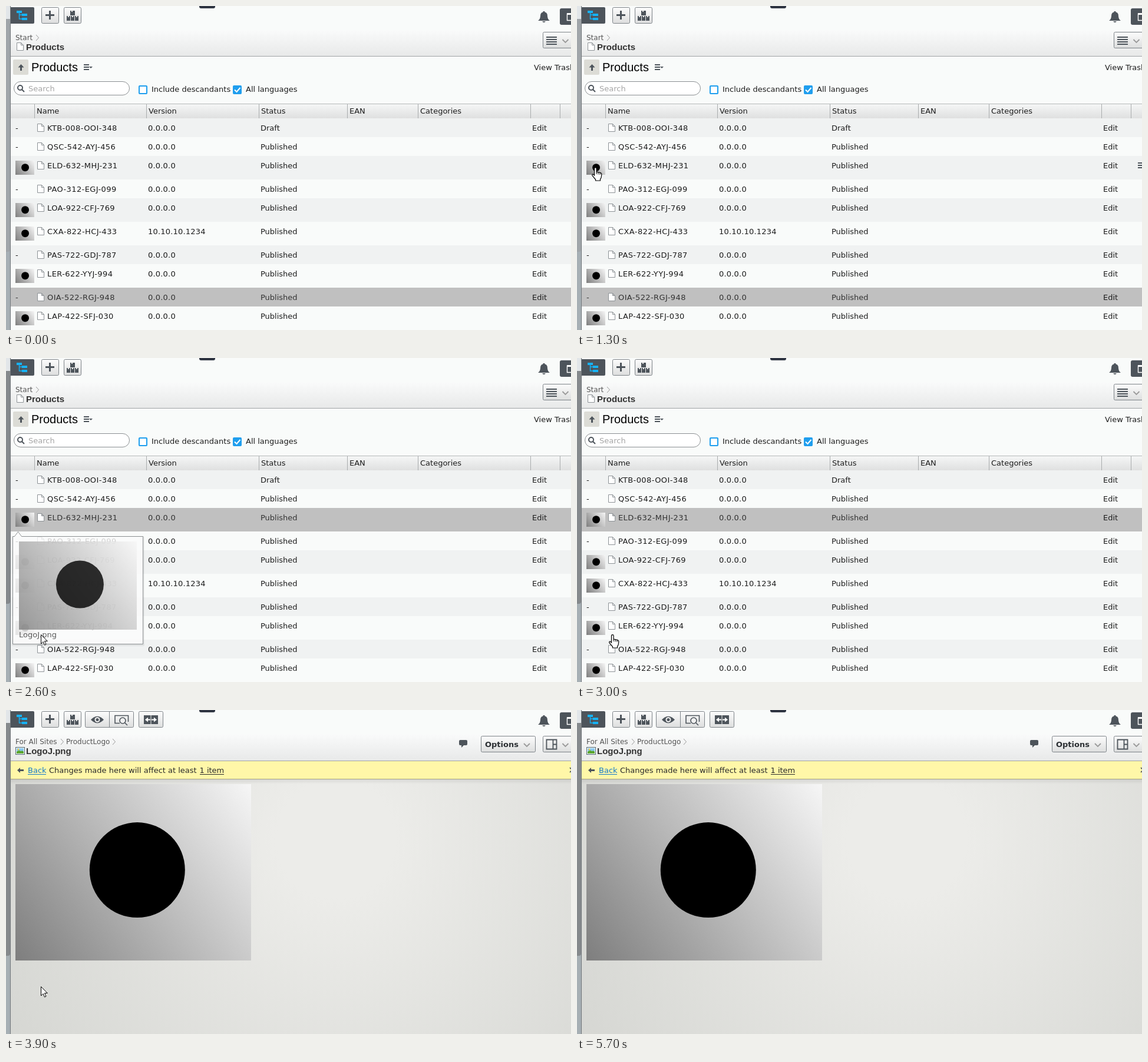
Animation of 959x551 px, one loop 5800 ms. Source, as an HTML page with a canvas:

```html
<!DOCTYPE html>
<html lang="en">
<head>
<meta charset="utf-8">
<title>Product list</title>
<style>
  html, body { margin: 0; width: 100%; height: 100%; overflow: hidden; background: #f9fbfa; }
  canvas { display: block; }
</style>
</head>
<body>
<canvas id="stage" width="959" height="551"></canvas>
<script>
const ctx = document.getElementById('stage').getContext('2d');
const LOOP = 5800, STEP = 100;
const SANS = '"DejaVu Sans", Verdana, sans-serif';
const ARIAL = '"Liberation Sans", Arial, sans-serif';
const DARK = '#4d545b', INK = '#1c1c1c', BLUE = '#1f9eee';

// name, version, status, row height, has thumbnail
const ROWS = [
  ['KTB-008-OOI-348', '0.0.0.0', 'Draft', 32, false],
  ['QSC-542-AYJ-456', '0.0.0.0', 'Published', 32, false],
  ['ELD-632-MHJ-231', '0.0.0.0', 'Published', 40, true],
  ['PAO-312-EGJ-099', '0.0.0.0', 'Published', 32, false],
  ['LOA-922-CFJ-769', '0.0.0.0', 'Published', 40, true],
  ['CXA-822-HCJ-433', '10.10.10.1234', 'Published', 40, true],
  ['PAS-722-GDJ-787', '0.0.0.0', 'Published', 32, false],
  ['LER-622-YYJ-994', '0.0.0.0', 'Published', 40, true],
  ['OIA-522-RGJ-948', '0.0.0.0', 'Published', 32, false],
  ['LAP-422-SFJ-030', '0.0.0.0', 'Published', 40, true]
];
const COLUMNS = [[48, 'Name'], [238, 'Version'], [429, 'Status'], [579, 'EAN'], [699, 'Categories'], [890, ''], [940, '']];

// time, hotspot x, hotspot y, shape, hovered row
const POINTER = [
  [0, 0, 0, null, -1], [100, 596, 149, 'arrow', -1],
  [300, 490, 186, 'arrow', -1], [400, 367, 227, 'arrow', 1],
  [600, 210, 206, 'arrow', 0], [700, 58, 250, 'hand', 1],
  [900, 53, 256, 'hand', 2], [1000, 47, 261, 'hand', 2],
  [1100, 40, 266, 'hand', 2], [1200, 34, 271, 'hand', 2],
  [1300, 30, 274, 'hand', 2], [1800, 61, 276, 'hand', 2],
  [2200, 61, 318, 'arrow', -1], [2300, 58, 385, 'arrow', -1],
  [2400, 55, 436, 'arrow', -1], [2600, 59, 470, 'arrow', -1],
  [3000, 59, 470, 'hand', -1], [3800, 59, 470, 'arrow', -1],
  [4100, 394, 282, 'arrow', -1], [5100, 505, 262, 'arrow', -1],
  [5200, 607, 241, 'arrow', -1], [5400, 690, 229, 'arrow', -1],
  [5500, 795, 217, 'arrow', -1], [5600, 889, 209, 'arrow', -1],
  [5700, 0, 0, null, -1]
];

function rect(x, y, w, h, fill) {
  ctx.fillStyle = fill;
  ctx.fillRect(x, y, w, h);
}
function linear(x0, y0, x1, y1, from, to) {
  const g = ctx.createLinearGradient(x0, y0, x1, y1);
  g.addColorStop(0, from);
  g.addColorStop(1, to);
  return g;
}
function path(d, fill, stroke, width = 1, x = 0, y = 0) {
  const p = new Path2D(d);
  ctx.save();
  ctx.translate(x, y);
  if (fill) { ctx.fillStyle = fill; ctx.fill(p); }
  if (stroke) { ctx.strokeStyle = stroke; ctx.lineWidth = width; ctx.stroke(p); }
  ctx.restore();
}
function rounded(x, y, w, h, r, fill, stroke, width = 1) {
  ctx.beginPath();
  ctx.roundRect(x, y, w, h, r);
  if (fill) { ctx.fillStyle = fill; ctx.fill(); }
  if (stroke) { ctx.strokeStyle = stroke; ctx.lineWidth = width; ctx.stroke(); }
}
function disc(x, y, r, fill) {
  ctx.beginPath();
  ctx.arc(x, y, r, 0, Math.PI * 2);
  ctx.fillStyle = fill;
  ctx.fill();
}
function text(s, x, baseline, { size = 13, color = INK, family = SANS, weight = '', spacing = 0 } = {}) {
  ctx.font = `${weight} ${size}px ${family}`;
  ctx.letterSpacing = spacing + 'px';
  ctx.fillStyle = color;
  ctx.fillText(s, x, baseline);
}
function button(x, y, w, h) {
  rounded(x + .5, y + .5, w - 1, h - 1, 2, linear(0, y, 0, y + h, '#fdfdfd', '#dcdddd'), '#7d8388');
}
const docIcon = (x, y) => path('M.5 .5H7.5L11.5 4.5V13.5H.5ZM7.5 .5V4.5H11.5', '#fff', '#8d9296', 1, x, y);
const crumbArrow = x => path('M0 0L4.5 5L0 10', null, '#999', 1, x, 49);
const downArrow = x => path('M0 0L5 5L10 0', null, '#9a9a9a', 1.8, x, 57);
const menuIcon = (x, y, w) => [0, 4, 8].forEach(dy => rect(x, y + dy, w, 2, DARK));

// Picture with a plain disc standing in for the mark
function picture(x, y, w, h) {
  rect(x, y, w, h, linear(x, y + h, x + w, y, '#7e7e7e', '#f6f6f6'));
  disc(x + w * .517, y + h * .487, h * .27, '#000');
}

function sidebar(dark) {
  rect(0, 0, 7, 551, '#a6afb4');
  rect(0, 0, 7, 22, '#e2e6e9');
  rounded(0, 22, 7, 396, [0, 0, 4, 0], dark ? '#85898c' : '#a0a5a9');
  rect(7, 0, 1, 551, '#73787c');
}

function toolbar(detail) {
  rect(8, 0, 951, 42, '#f9fbfa');
  rounded(328, -4, 27, 8, 3, '#2f3542');
  rounded(8, 2, 40, 28, [0, 2, 2, 0], DARK);
  path('M18 8h9v4h-9zM27 13h9v4h-9zM27 20h9v4h-9z', '#16b2f5');
  path('M22.5 12V22H27M22.5 15H27', null, '#16b2f5', 1.4);

  button(60, 2, 30, 28);
  rect(67, 14, 15, 3, DARK);
  rect(73, 8, 3, 15, DARK);
  button(98, 2, 30, 28);
  for (const [x, y] of [[109, 8], [103, 17], [110, 17], [117, 17]]) {
    rect(x, y, x === 109 ? 8 : 6, 8, DARK);
    rect(x + 2, y, 2, 2, '#e8e8e8');
  }
  if (detail) {
    button(134, 2, 83, 28);
    rect(175, 2, 1, 28, '#7d8388');
    path('M144 16.5Q155 5 166 16.5Q155 28 144 16.5Z', DARK);
    disc(155, 16.5, 4.5, '#f0f0f0');
    disc(155, 16.5, 2.5, DARK);
    path('M193 22.5H185V9.5H207.5V20', null, DARK, 1.6);
    disc(198, 18, 5.5, '#f0f0f0');
    path('M203 18a5 5 0 1 0-10 0a5 5 0 1 0 10 0M201.500 21.500L206 26', null, DARK, 1.6);
    button(225, 2, 42, 28);
    rect(234, 9, 24, 15, DARK);
    path('M236 16.500l5-4v3h4v2h-4v3zM256 16.500l-5-4v3h-4v2h4v3z', '#fff');
    rect(245.500, 9, 1, 15, '#eee');
  }
  path('M903 25Q907 22 907 17Q907 11 911.500 10.500V9h3v1.500Q919 11 919 17Q919 22 923 25ZM910 26h6q-3 4-6 0z', DARK);
  rounded(940, 4, 25, 28, 3, DARK);
  path('M952.500 13.500H962V24.500H952.500Z', null, '#fff', 1.4);
  rect(952, 12, 8, 3, '#fff');
}

function detailActions() {
  path('M771 51h10q2 0 2 2v5q0 2-2 2h-4l-4 4v-4h-2q-2 0-2-2v-5q0-2 2-2z', DARK);
  button(806, 44, 93, 28);
  text('Options', 813, 63, { weight: 'bold', color: '#2b2f33' });
  downArrow(879);
}

function headerBand(bottom) {
  rect(8, 42, 951, bottom - 42, linear(0, 42, 0, bottom, '#f9fafa', '#e8e9e9'));
  rect(8, bottom, 951, 1, '#a0a3a5');
  button(911, 44, 60, 28);
  downArrow(944.500);
}

function listPage(selected, hovered) {
  headerBand(85);
  [52, 56, 60, 64].forEach(y => rect(917, y, 18, 2, DARK));
  text('Start', 16, 58, { size: 12, color: '#555' });
  crumbArrow(51);
  docIcon(18, 62);
  text('Products', 34, 75, { size: 15, weight: 'bold', family: ARIAL, color: '#333' });

  rect(8, 86, 951, 80, '#f9fbfa');
  rounded(12, 91, 26, 26, 2, '#dcdcd6');
  path('M25.500 99l5 5.500h-3.500v5.500h-3v-5.500h-3.500z', DARK);
  text('Products', 43, 111, { size: 20, family: ARIAL, color: '#000' });
  menuIcon(132, 99, 9);
  path('M141 103h6l-3 3z', DARK);
  text('View Trash', 896, 109);

  rounded(13.5, 128.5, 196, 23, 11.5, '#fff', '#8b8f92');
  path('M28 139a4 4 0 1 0-8 0a4 4 0 1 0 8 0M27 142L31 146', null, DARK, 2);
  text('Search', 38, 145, { color: '#a5a5a5' });
  rounded(226, 136, 13, 13, 1, '#fff', BLUE, 2);
  text('Include descandants', 247, 146);
  rounded(385, 135, 15, 15, 2, BLUE);
  path('M388 142.500l3.500 3.500l6-7', null, '#fff', 2);
  text('All languages', 407, 146);

  rect(8, 166, 951, 25, linear(0, 166, 0, 191, '#f6f7f7', '#dfe0e0'));
  rect(8, 166, 951, 1, '#b5b8b9');
  for (const [x, label] of COLUMNS) {
    rect(x, 167, 1, 24, '#a9acad');
    text(label, x + 4, 183);
  }

  let y = 191;
  ROWS.forEach(([name, version, status, height, thumb], i) => {
    const on = i === selected, color = on ? '#333' : INK;
    rect(8, y, 951, height, on ? '#c0c0c0' : i % 2 ? '#f9fbfa' : '#f0f2f2');
    if (thumb) picture(16, y + 8, 32, 24);
    else text('-', 16, y + 21, { color });
    docIcon(53, y + 9);
    text(name, 70, y + 21, { color, spacing: .4 });
    text(version, 241, y + 21, { color, spacing: .2 });
    text(status, 432, y + 21, { color });
    text('Edit', 893, y + 21);
    if (i === hovered) menuIcon(952, y + 11, 7);
    y += height;
  });
}

function tooltip(opacity) {
  if (!opacity) return;
  ctx.save();
  ctx.globalAlpha = opacity;
  rounded(10, 303, 225, 187, 2, 'rgba(0,0,0,.08)');
  path('M11.500 303.500H14.500L20.500 295.500L26.500 303.500H232.500V486.500H11.500Z', '#fff', '#72777a');
  picture(22, 312, 200, 150);
  text('LogoJ.png', 22, 475, { color: '#333' });
  ctx.restore();
}

function detailPage() {
  const glow = ctx.createRadialGradient(560, 220, 100, 560, 220, 640);
  glow.addColorStop(0, '#ecece9');
  glow.addColorStop(1, '#d6d7d3');
  rect(8, 118, 951, 433, glow);
  rect(8, 118, 951, 8, linear(0, 118, 0, 126, 'rgba(0,0,0,.08)', 'rgba(0,0,0,0)'));
  headerBand(86);
  detailActions();
  path('M917.500 50.500H934.500V66.500H917.500ZM928.500 50.500V66.500M928.500 58.500H934.500', null, DARK, 1.8);

  text('For All Sites', 16, 58, { size: 12, color: '#555' });
  crumbArrow(93);
  text('ProductLogo', 102, 58, { size: 12, color: '#555' });
  crumbArrow(181);
  rect(16, 63, 16, 13, '#4c6570');
  rect(17, 64, 14, 11, '#fff');
  rect(18, 65, 12, 9, '#8ccaf0');
  path('M18 74V71Q22 67 25 70Q28 68 30 71V74Z', '#5aa62e');
  disc(21, 67, 1.5, '#f6cf3d');
  text('LogoJ.png', 34, 75, { size: 15, weight: 'bold', family: ARIAL, color: '#333' });

  rect(8, 87, 951, 30, '#fff7a8');
  rect(8, 117, 951, 1, '#a5a384');
  path('M19 102.500l5-4.500v3h6v3h-6v3z', DARK);
  text('Back', 37, 107, { color: '#1479c9' });
  rect(37, 109, 31, 1, '#1479c9');
  text('Changes made here will affect at least', 73, 107, { color: '#2a2a2a' });
  text('1 item', 328.500, 107, { color: '#2a2a2a' });
  rect(329, 109, 41, 1, '#2a2a2a');
  path('M957 98l8 8M957 106l8-8', null, DARK, 1.6);
  picture(16, 126, 400, 300);
}

function pointer(x, y, shape) {
  if (shape === 'arrow') {
    path('M.5 .5V16L4 12.500L6.500 18.200L9 17L6.500 11.500H11.300Z', '#fff', '#000', 1, x, y);
  } else if (shape === 'hand') {
    path('M-.5 2.500a1.800 1.800 0 0 1 3.600 0V8l7 1.700q2 .6 1.600 3.800l-.7 4.500-1.500 2.500v2.500H1.500V21L-4 14.500q-1-2.800 1.500-2.300L-.5 14Z', '#fff', '#000', 1.2, x, y);
    path('M3.100 8v4M6 9v3.500M9 10v3', null, '#000', 1, x, y);
  }
}

function tooltipOpacity(t) {
  if (t < 1700 || t >= 3000) return 0;
  return t < 2600 ? 1 : (3000 - t) / 500;
}

function draw(t) {
  const [, x, y, shape, hovered] = POINTER.findLast(key => key[0] <= t);
  rect(0, 0, 959, 551, '#f8f8f8');
  sidebar(t >= 1400);
  toolbar(t >= 3800);
  if (t < 3800) {
    listPage(t < 1400 ? 8 : 2, hovered);
    tooltip(tooltipOpacity(t));
  } else if (t < 3900) {
    detailActions();
  } else {
    detailPage();
  }
  pointer(x, y, shape);
}

function tick() {
  draw(Math.floor(performance.now() % LOOP / STEP) * STEP);
  requestAnimationFrame(tick);
}
tick();
</script>
</body>
</html>
```
